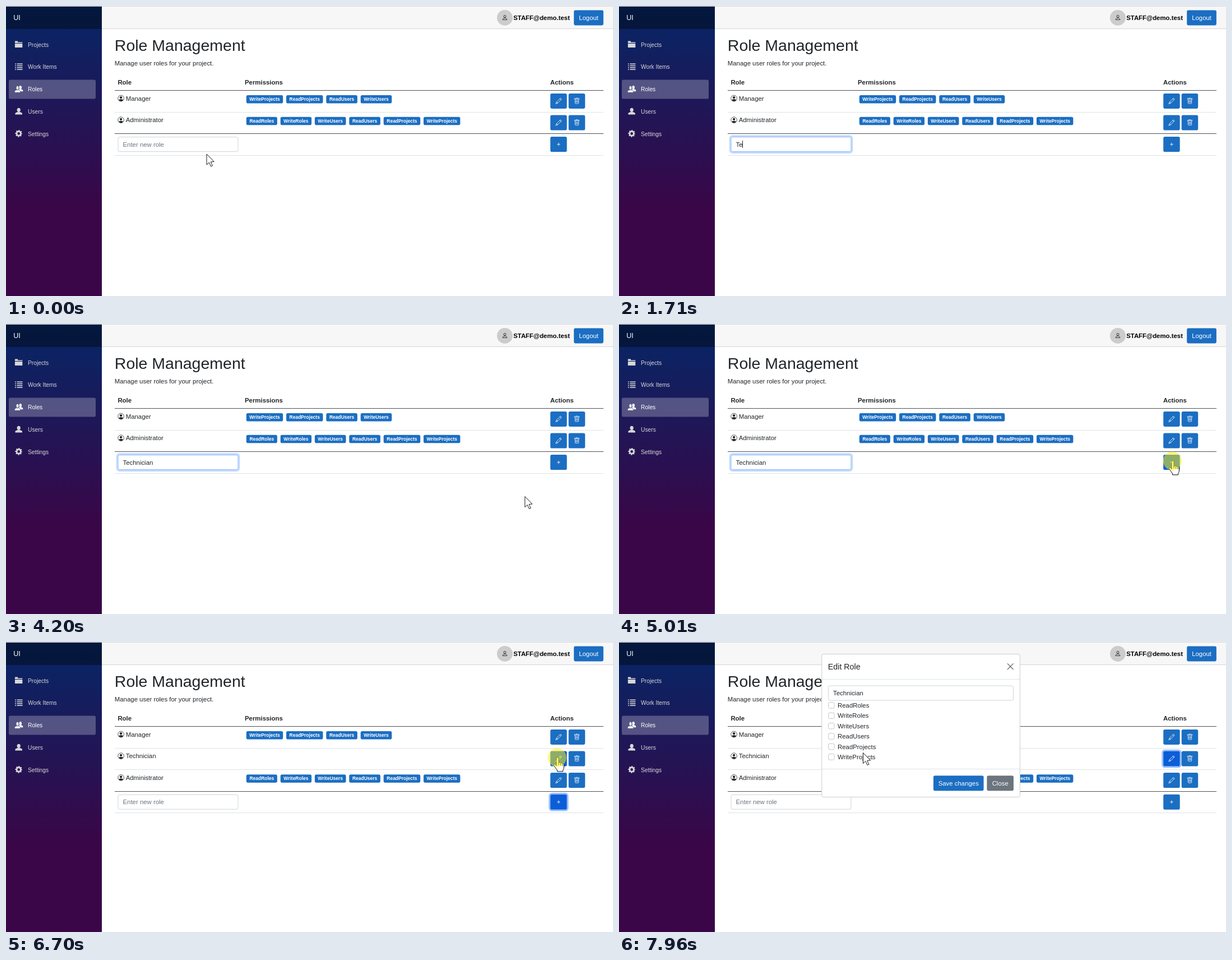
Recreate the animation shown at these times as an HTML page. Size 1083 by 517 pixels, loop 8000 ms.

```html
<!DOCTYPE html>
<html lang="en">
<head>
<meta charset="utf-8">
<title>Role Management</title>
<style>
html, body { margin: 0; width: 100%; height: 100%; overflow: hidden; background: #fff; }
svg { display: block; width: 1083px; height: 517px; }
text { font-family: "Liberation Sans", Arial, sans-serif; font-size: 11.4px; fill: #212529; white-space: pre; }
.b { font-weight: bold; }
.mid { text-anchor: middle; }
.line { shape-rendering: crispEdges; }
</style>
</head>
<body>
<svg id="stage" viewBox="0 0 1083 517"></svg>
<script>
const LOOP = 8000, PITCH = 38.6;
const BLUE = '#1b6ec2', HOVER = '#0b5ed7', INK = '#212529';

const rect = (x, y, w, h, fill, attrs = '') =>
  `<rect x="${x}" y="${y}" width="${w}" height="${h}" fill="${fill}" ${attrs}/>`;
const text = (x, y, s, attrs = '') => `<text x="${x}" y="${y}" ${attrs}>${s}</text>`;
const at = (x, y, s, attrs = '') => `<g transform="translate(${x} ${y})" ${attrs}>${s}</g>`;
const line = (y, dark) => rect(193.8, y, 872, 1, dark ? '#4d5154' : '#dee2e6', 'class="line"');
const stroked = (d, color, width) => `<path d="${d}" fill="none" stroke="${color}" stroke-width="${width}"/>`;

// 16-unit icons drawn around their centre at text size
const icon = (x, y, s) => `<g transform="translate(${x} ${y}) scale(.7125) translate(-8 -8)">${s}</g>`;
const ICONS = {
  user: `<circle cx="8" cy="8" r="7.5" fill="none" stroke="${INK}" stroke-width="1.1"/>
    <circle cx="8" cy="6" r="3" fill="${INK}"/>
    <path d="M2.5 12.4C3.2 11.2 4.8 10 8 10s4.8 1.2 5.5 2.4A7 7 0 0 1 2.5 12.4z" fill="${INK}"/>`,
  pencil: stroked('M12.5.7l2.8 2.8L5.5 13.4.8 15.2l1.8-4.7zM10.8 2.5l2.8 2.8M3.4 10.5v1h1v1h1v1', '#fff', 1.1),
  trash: stroked('M2 1.5h12v2H2zM6.3 1.3V.5h3.4v.8M3.5 3.7V13q0 1.5 1.5 1.5h6q1.5 0 1.5-1.5V3.7M5.5 5.7v6.6M8 5.7v6.6M10.5 5.7v6.6', '#fff', 1),
  plus: stroked('M8 4v8M4 8h8', '#fff', 1.2)
};

const ring = (id, x, y, w, h, color) =>
  rect(x - 1.4, y - 1.4, w + 2.8, h + 2.8, 'none',
    `id="${id}" rx="4.2" stroke="${color}" stroke-width="2.9" opacity="0"`);
const button = (id, x, y, name) =>
  ring(id + 'Ring', x, y, 29.5, 27, '#98c1fe') +
  rect(x, y, 29.5, 27, BLUE, `id="${id}" rx="2.8"`) + icon(x + 14.8, y + 13.5, ICONS[name]);
const labelled = (x, y, w, s, fill) =>
  rect(x, y, w, 27, fill, 'rx="2.8"') + text(x + w / 2, y + 17.5, s, 'class="mid" style="fill:#fff"');
const field = (id, x, y, w) =>
  rect(x + .5, y + .5, w - 1, 26, '#fff', `id="${id}" rx="2.8" stroke="#ced4da"`);

const BADGE = { ReadRoles: 55.1, WriteRoles: 55.4, WriteUsers: 55.6, ReadUsers: 55.6, ReadProjects: 65.5, WriteProjects: 65.4 };
const ALL = Object.keys(BADGE);

function badges(names, y) {
  let x = 428.8, out = '';
  for (const n of names) {
    const w = BADGE[n];
    out += rect(x, y, w, 14.5, BLUE, 'rx="2.8"') +
      text(x + w / 2, y + 10.2, n, 'class="b mid" style="fill:#fff;font-size:8.5px"');
    x += w + 5.8;
  }
  return out;
}

function row(id, i, name, perms) {
  const y = 150 + i * PITCH;
  return icon(205.1, y + 14.6, ICONS.user) + text(213.7, y + 18.8, name) + badges(perms, y + 9.1) +
    button(id + 'Edit', 971.2, y + 5.9, 'pencil') + button(id + 'Del', 1003.7, y + 5.9, 'trash');
}

const person = '<ellipse cy="-2.4" rx="3.1" ry="3.6"/><path d="M-6.3 5.8V4c0-1.5 2.6-2.1 3.8-2.7h5C3.7 1.9 6.3 2.5 6.3 4v1.8z"/>';
const NAV = [
  ['Projects', '<path d="M-6.8-6h5.2v2h8.2v1.4H-6.8zM-6.8-1.6H6.6v7H-6.8z"/>'],
  ['Work Items', [-5, -1.7, 1.6, 4.9].map(y => rect(-6.6, y - .8, 1.8, 1.6, '#d7d7d7') + rect(-3.2, y - .8, 10, 1.6, '#d7d7d7')).join('')],
  ['Roles', `<g transform="translate(3 -.8) scale(.72 .86)">${person}</g>
    <g transform="translate(-2.2 .4) scale(.82 1)" stroke="#55517f">${person}</g>`],
  ['Users', person],
  ['Settings', `<g fill="none"><circle r="3.7" stroke="#d7d7d7" stroke-width="2.8"/>
    <circle r="5.3" stroke="#d7d7d7" stroke-width="2.2" stroke-dasharray="2.08" stroke-dashoffset="1.04"/></g>`]
];

function sidebar() {
  let out = rect(0, 1, 171, 516, 'url(#side)') + rect(0, 1, 171, 40, '#000', 'opacity=".4"') +
    text(13.3, 25.3, 'UI', 'style="fill:#fff;font-size:12.5px"') +
    rect(5, 131.4, 155, 34.2, '#fff', 'rx="2.8" opacity=".25"');
  NAV.forEach(([name, shape], i) => {
    const y = 69 + i * 39.7, color = i === 2 ? '#fff' : '#d7d7d7';
    out += at(22.7, y - .4, shape, `fill="${color}"`) +
      text(39, y + 3.7, name, `style="fill:${color};font-size:10.26px"`);
  });
  return out;
}

function header() {
  return rect(171, 1, 912, 40, '#f7f7f7') + rect(171, 40, 912, 1, '#d6d5d5') +
    rect(0, 0, 1083, 1, '#dcdcdc') +
    '<circle cx="890" cy="20.9" r="14" fill="#ccc"/>' +
    at(890, 20.6, `<circle cy="-2.1" r="2" fill="none" stroke="${INK}" stroke-width=".9"/>` +
      stroked('M-3.9 3.9c0-4.1 7.8-4.1 7.8 0z', INK, .9)) +
    text(905.2, 25, 'STAFF@demo.test', 'class="b" style="fill:#000"') +
    labelled(1013.2, 7.4, 52.7, 'Logout', BLUE);
}

function modal() {
  let out = rect(361.8, 21.5, 353.6, 255, '#fff', 'rx="3.4" stroke="#ccc"') +
    text(372.8, 48.9, 'Edit Role', 'style="font-size:14.25px"') +
    stroked('M693 38.4l10.6 10.6M703.6 38.4l-10.6 10.6', '#666', 1.3) +
    rect(362, 66, 353, 1, '#dee2e6') + rect(362, 226, 353, 1, '#dee2e6') +
    field('roleName', 373, 77.5, 331) + text(382, 95, 'Technician');
  ALL.forEach((n, i) => {
    const y = 113 + i * 18.4;
    out += rect(373.6, y - 5.4, 10.6, 10.6, '#fff', 'rx="2.6" stroke="#bfbfbf" stroke-width=".9"') + text(390, y + 3.9, n);
  });
  return out + labelled(561, 238.3, 89.6, 'Save changes', BLUE) + labelled(656.4, 238.3, 47.6, 'Close', '#6c757d');
}

const CURSORS = `<g id="cursor">
  <path id="arrow" d="M0 0v19l4.4-4 3.2 7 2.8-1.2-3.1-6.9 5.9-.4z" fill="#fff" stroke="#000" stroke-width=".9"/>
  <path id="beam" d="M-4.5-8.6h3.3l1.2.8 1.2-.8h3.3M-4.5 9.4h3.3l1.2-.8 1.2.8h3.3M0-8v17" fill="none" stroke="#000" stroke-width="1.8"/>
  <g id="hand" stroke="#000" fill="#fff" stroke-width="1">
    <path d="M-2 1.5a2 2 0 0 1 4 0v8c1-1 3-1 3.6.6c1-.8 2.8-.4 3.2 1c1.2-.6 2.6.2 2.6 1.8v5c0 2-1.2 3.4-1.8 5v2h-10v-2c-1.6-2.6-4.6-6-6-9c-.8-2 1.6-2.8 2.8-1.2l1.6 2z"/>
    <path d="M2 9.5v4M5.6 10.5v3.5M8.8 11.5v3" fill="none"/>
  </g></g>
  <circle id="halo" r="16.6" fill="#fbf014" opacity=".54"/>`;

const inputY = 150 + 2 * PITCH + 5.9;
document.getElementById('stage').innerHTML =
  `<defs><linearGradient id="side" x1="0" y1="0" x2="0" y2="1">
    <stop offset="0" stop-color="#052767"/><stop offset=".7" stop-color="#3a0647"/></linearGradient></defs>` +
  rect(0, 0, 1083, 517, '#fff') + sidebar() + header() +
  text(193.8, 80.2, 'Role Management', 'style="font-size:28.5px"') +
  text(193.8, 105.6, 'Manage user roles for your project.') +
  ['Role', 'Permissions', 'Actions'].map((s, i) => text([199.4, 426, 971][i], 139.7, s, 'class="b"')).join('') +
  line(150, true) + row('manager', 0, 'Manager', ['WriteProjects', 'ReadProjects', 'ReadUsers', 'WriteUsers']) +
  line(150 + PITCH) +
  `<g id="added">${row('tech', 1, 'Technician', [])}${line(150 + 2 * PITCH)}</g>
  <g id="tail">${row('admin', 1, 'Administrator', ALL)}${line(150 + 2 * PITCH, true)}${line(150 + 3 * PITCH)}
    ${ring('inputRing', 199.5, inputY, 215, 27, '#c2dbfe')}${field('input', 199.5, inputY, 215)}
    ${text(208.5, inputY + 17.7, 'Enter new role', 'id="hint" style="fill:#6c757d"')}
    ${text(208.5, inputY + 17.7, '', 'id="typed"')}
    ${rect(209, 240, 1, 13, INK, 'id="caret"')}
    ${button('plus', 971.2, inputY, 'plus')}</g>
  <g id="modal">${modal()}</g>` + CURSORS;

const el = {};
document.querySelectorAll('[id]').forEach(e => el[e.id] = e);
const set = (e, name, value) => e.setAttribute(name, value);
const show = (e, on) => set(e, 'visibility', on ? 'visible' : 'hidden');
const ramp = (t, from, length) => Math.min(1, Math.max(0, (t - from) / length));
const within = (t, spans) => spans.some(([a, b]) => t >= a && t < b);

// time, x, y of the pointer
const PATH = [
  [0, 358, 264], [70, 358, 264], [360, 359.5, 247.3], [3920, 359.5, 247.3], [3990, 425, 253],
  [4070, 620, 285], [4140, 830, 304], [4210, 940, 308], [4310, 998, 302], [4390, 1005, 294],
  [4650, 1005, 294], [4720, 1002, 280], [4870, 988, 244], [5540, 988, 244], [5680, 940, 219],
  [5750, 950.5, 206], [5890, 963, 198], [6140, 963, 198], [6560, 984, 206], [7160, 984, 206],
  [7230, 910, 211], [7360, 655, 231], [7430, 597, 234], [7630, 597, 234], [7820, 470, 205], [7960, 435.5, 197.5], [LOOP, 435.5, 197.5]
];
const WORD = 'Technician';
const KEYS = [1440, 1710, 1990, 2120, 2330, 2590, 2850, 2990, 3190, 3320];
const CARET = [[700, 1170], [1440, 3320], [3460, 3920], [4390, 4870]];
const CLICKS = [[630, 770], [5010, 5150], [6700, 6820]];
const BLUR = 5080, ADD = 5150, EDIT = 6760, OPEN = 6820;

function pointer(t) {
  const i = PATH.findIndex(p => p[0] > t);
  const [t0, x0, y0] = PATH[i - 1], [t1, x1, y1] = PATH[i];
  const k = (t - t0) / (t1 - t0);
  return [x0 + (x1 - x0) * k, y0 + (y1 - y0) * k];
}

function draw(t) {
  const added = t >= ADD, [x, y] = pointer(t);

  show(el.added, added);
  set(el.tail, 'transform', `translate(0 ${added ? PITCH : 0})`);
  show(el.modal, t >= OPEN);

  const word = added ? '' : WORD.slice(0, KEYS.filter(k => t >= k).length);
  el.typed.textContent = word;
  show(el.hint, !word);
  show(el.caret, within(t, CARET));
  set(el.caret, 'x', Math.floor(208.8 + (word ? el.typed.getComputedTextLength() : 0)));

  const focus = ramp(t, 630, 210) * (1 - ramp(t, BLUR, 170));
  set(el.inputRing, 'opacity', focus);
  set(el.input, 'stroke', focus > .4 ? '#86b7fe' : '#ced4da');

  const onButton = x > 971 && x < 1001 && t < 7160;
  const low = onButton && y > 233 && y < 260.5;
  const high = onButton && added && y > 194.5 && y < 221.5;
  const plusFocus = ramp(t, BLUR, 150) * (1 - ramp(t, EDIT, 60));
  const editFocus = ramp(t, EDIT, 60);
  set(el.plus, 'fill', plusFocus || (low && !added) ? HOVER : BLUE);
  set(el.plusRing, 'opacity', plusFocus);
  set(el.adminEdit, 'fill', low && added ? HOVER : BLUE);
  set(el.techEdit, 'fill', high || editFocus ? HOVER : BLUE);
  set(el.techEditRing, 'opacity', editFocus);

  const seen = t < KEYS[0] || t >= 3920;
  const hand = low || high;
  const beam = !added && x > 199 && x < 415 && y > 233 && y < 260;
  set(el.cursor, 'transform', `translate(${x} ${y})`);
  show(el.hand, seen && hand);
  show(el.beam, seen && beam);
  show(el.arrow, seen && !hand && !beam);
  set(el.halo, 'transform', `translate(${x - .7} ${y})`);
  show(el.halo, within(t, CLICKS));
}

const start = performance.now();
function tick() {
  draw((performance.now() - start) % LOOP);
  requestAnimationFrame(tick);
}
tick();
</script>
</body>
</html>
```
